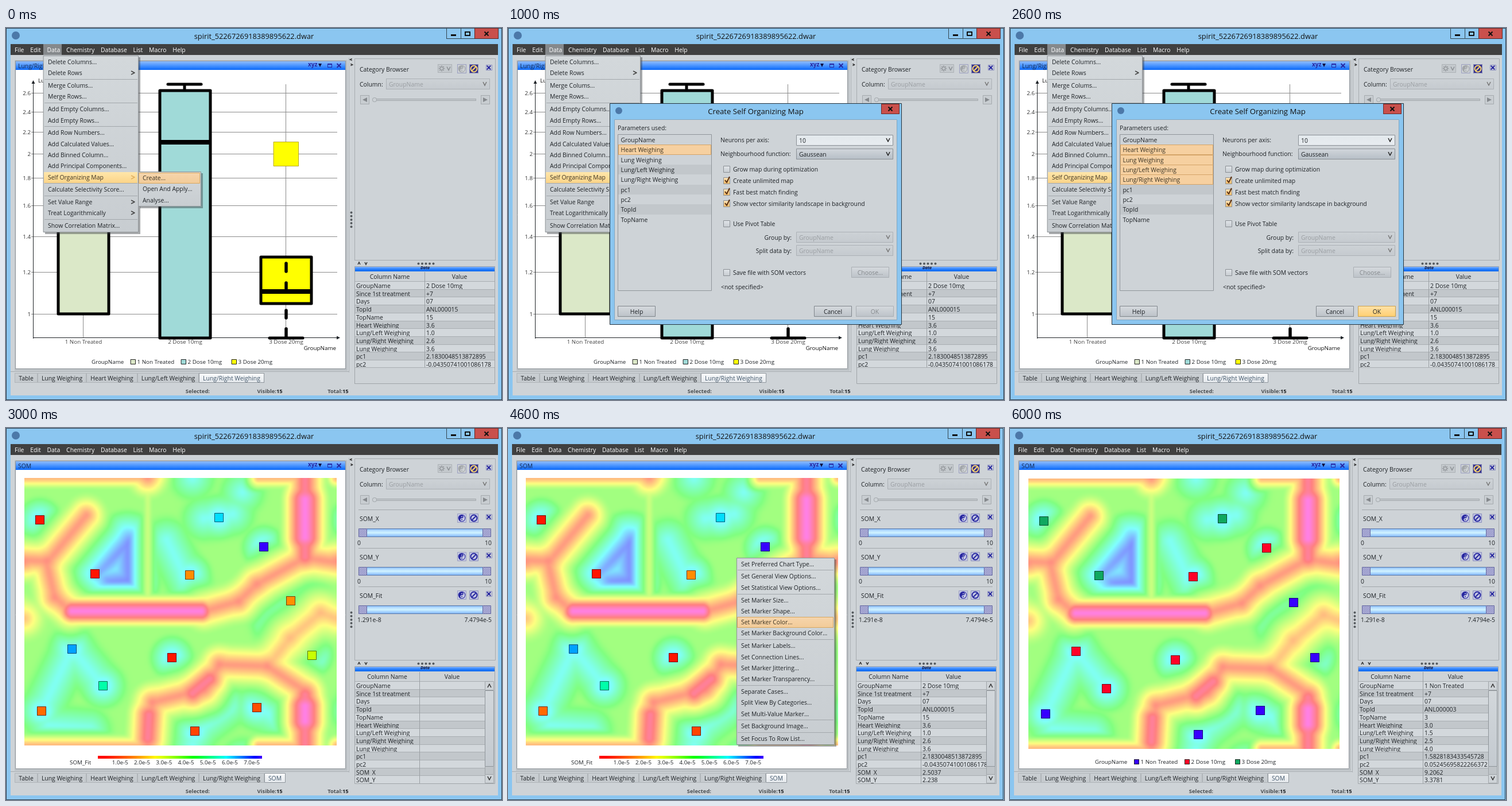
Animation of 864 by 648 pixels, one loop 7 s. Source, as an HTML page with a canvas:

```html
<!DOCTYPE html>
<html lang="en">
<head>
<meta charset="utf-8">
<title>Self organizing map</title>
<style>
html, body { margin: 0; width: 864px; height: 648px; overflow: hidden; }
canvas { display: block; }
</style>
</head>
<body>
<canvas width="864" height="648"></canvas>
<script>
const g = document.querySelector('canvas').getContext('2d');
const BLUE = '#8bc6f0', PANEL = '#ced3d7', DARK = '#c2c7cb', EDGE = '#a5aaae', INK = '#1e2226',
  NAVY = '#2828a0', PALE = '#9a9ea2', PICK = '#f6d0a0', LOGO = '#4c78a8', CLOSE = '#c9504c';

// ---- drawing helpers (text y is the middle of the line) ----
function text(s, x, y, color = INK, align = 'left', size = 10.4, weight = '') {
  g.font = `${weight} ${size}px "Open Sans", sans-serif`;
  g.textAlign = align;
  g.fillStyle = color;
  g.fillText(s, x, y + 4);
  return g.measureText(s).width;
}
function rect(x, y, w, h, fill, stroke) {
  if (fill) { g.fillStyle = fill; g.fillRect(x, y, w, h); }
  if (stroke) { g.strokeStyle = stroke; g.lineWidth = 1; g.strokeRect(x + .5, y + .5, w - 1, h - 1); }
}
function blend(x, y, w, h, colors, stroke, across) {
  const b = across ? g.createLinearGradient(x, 0, x + w, 0) : g.createLinearGradient(0, y, 0, y + h);
  colors.forEach((c, i) => b.addColorStop(i / (colors.length - 1), c));
  rect(x, y, w, h, b, stroke);
}
function line(points, color = INK, width = 1, cap = 'butt') {
  g.strokeStyle = color; g.lineWidth = width; g.lineCap = cap;
  g.beginPath();
  for (let i = 0; i < points.length; i += 2) g.lineTo(points[i], points[i + 1]);
  g.stroke();
}
function disc(x, y, r, color) {
  g.fillStyle = color; g.beginPath(); g.arc(x, y, r, 0, 7); g.fill();
}
function cross(x, y, r, color, width = 2) {
  line([x - r, y - r, x + r, y + r], color, width);
  line([x - r, y + r, x + r, y - r], color, width);
}
// dx, dy give the pointing direction
function chevron(x, y, dx, dy, color = '#333', r = 3, width = 1.5) {
  line([x - r * (dx || 1), y - r * (dy || 1), x + r * dx, y + r * dy,
    x + (dx ? -r * dx : r), y + (dy ? -r * dy : r)], color, width);
}
function triangle(x, y, dx, dy, color, r) {
  g.fillStyle = color; g.beginPath();
  g.moveTo(x + dx * r, y + dy * r);
  g.lineTo(x - dx * r - dy * r, y - dy * r - dx * r);
  g.lineTo(x - dx * r + dy * r, y - dy * r + dx * r);
  g.fill();
}
function button(label, x, y, state) {
  blend(x, y, 66, 19, state === 'hot' ? ['#ffe2a8', '#ffcf70'] : ['#d6dade', '#bcc2c8'],
    state === 'hot' ? '#c9a050' : state === 'off' ? '#a9aeb3' : '#80868c');
  text(label, x + 33, y + 9.5, state === 'off' ? '#85898d' : INK, 'center');
}
function combo(label, x, y, w, style = ['#d2d7dc', '#b6bec6'], off) {
  blend(x, y, w, 19, off ? ['#cdd2d6', '#c5cacf'] : style, off ? '#acb1b6' : '#8a9096');
  text(label, x + 5, y + 9.5, off ? PALE : INK);
  chevron(x + w - 9, y + 9, 0, 1, off ? '#777' : '#222');
}
function checkbox(label, y, on, x = 375) {
  blend(x, y - 6, 12, 12, on ? ['#ffe8c0', '#f4b860'] : ['#e2e6ea', '#c6cbd0'], '#8a8f94');
  if (on) line([x + 3, y - 1, x + 6, y + 3, x + 11, y - 7], '#5a3010', 2);
  text(label, x + 17, y);
}
function list(items, x, y, w, isOn, onColor, onEdge) {
  items.forEach((s, i) => {
    const top = Math.round(y + 17.35 * i);
    rect(x, top, w, 18, isOn(i) ? onColor : i % 2 ? DARK : PANEL, isOn(i) ? onEdge : null);
    text(s, x + 4.5, top + 8.8, isOn(i) ? '#3c3424' : INK);
  });
}
// a leading "-" puts a separator above the item, a trailing ">" marks a submenu
function menu(x, y, w, h, first, items, hot) {
  rect(x + 3, y + 3, w, h, 'rgba(60,65,70,.45)');
  blend(x, y, w, h, ['#d3d8db', '#c8cdd1'], '#8d9296');
  let mid = first;
  items.forEach((item, i) => {
    const [, bar, label, sub] = item.match(/^(-?)(.*?)(>?)$/);
    if (i) mid += bar ? 21.8 : 19.3;
    const row = Math.round(mid), on = label.startsWith(hot);
    if (bar) line([x + 2, row - 10.5, x + w - 2, row - 10.5], '#a3a8ac');
    if (on) blend(x + 1, row - 9, w - 3, 19, sub ? ['#ffe6aa', '#fbd488'] : ['#f6d5ac', '#f2cb98'], sub ? null : '#d8a860');
    text(label, x + 8, row, on ? '#3c3424' : INK);
    if (sub) chevron(x + 156, row, 1, 0, on ? '#e0b060' : '#444');
  });
}
function dialog(title, x, y, w, h, margin, clientH) {
  rect(x, y, w, h, BLUE, '#26343e');
  rect(x + margin, y + 28, w - 2 * margin, clientH, PANEL, '#7fa6c2');
  disc(x + 16, y + 13, 6, LOGO);
  text(title, x + w / 2, y + 14.5, '#111', 'center', 13.2);
  rect(x + w - 36, y + 1, 32, 18, CLOSE, '#6f2a28');
  cross(x + w - 20, y + 10, 3.5, '#111');
}

// ---- data points per group: x, y, hue ----
const groups = ['1 Non Treated', '2 Dose 10mg', '3 Dose 20mg'];
const groupColors = ['#3700ff', '#ff0028', '#10a860'];
const markers = [
  [[496, 301, 34], [533, 396, 73], [62, 493, 25], [329, 528, 16], [437, 487, 18]],
  [[449, 207, 253], [320, 256, 33], [115, 385, 202], [289, 400, 5], [169, 449, 160]],
  [[59, 160, 5], [155, 254, 5], [371, 156, 188]]];

// ---- landscape on a torus: each valley or ridge line is a slope away from its level (a hue) ----
const MAP = { x: 32, y: 87, w: 544, h: 466 };
const valleys = [
  { level: 200, slope: -2.5, paths: markers.flat().map(([x, y]) => [x, y]) },
  { level: 230, slope: -2.3, paths: [[147, 255, 212, 200, 214, 265, 178, 270]] },
  { level: 174, slope: -1.7, paths: [[62, 493, 115, 385, 169, 449], [75, 520, 145, 526], [280, 195, 320, 275],
    [345, 158, 395, 150], [412, 112], [325, 553], [465, 340, 525, 294], [437, 487, 475, 505], [329, 528, 385, 485]] }];
const ridges = [
  { level: 14, slope: 2.7, paths: [[32, 230, 70, 232, 85, 295, 112, 318], [345, 319, 405, 302, 437, 272, 521, 226, 576, 234],
    [75, 230, 140, 152], [521, 458, 455, 415, 372, 412, 345, 455, 255, 478, 247, 553]] },
  { level: 34, slope: 2, paths: [[460, 410, 495, 366, 548, 322, 576, 332]] },
  { level: 28, slope: 5, paths: [[32, 553, 247, 553], [440, 553, 521, 553]] },
  { level: -12, slope: 3.3, paths: [[521, 465, 521, 690], [249, 500, 247, 540], [325, 462, 355, 437]] },
  { level: -48, slope: 4, paths: [[521, 125, 521, 190], [521, 485, 521, 510]] },
  { level: -45, slope: 5.8, paths: [[115, 319, 340, 319]] },
  { level: 86, slope: 5, paths: [[247, 115, 247, 290]] }];

const clamp = (v, low, high) => Math.max(low, Math.min(high, v));
const wrap = (d, size) => d - size * Math.round(d / size);
function segments(kinds) {
  return kinds.flatMap(({ level, slope, paths }) => paths.flatMap(p => {
    const out = [];
    for (let i = 0; i < Math.max(2, p.length - 2); i += 2) {
      const [ax, ay, bx = ax, by = ay] = p.slice(i, i + 4);
      const hx = (bx - ax) / 2, hy = (by - ay) / 2;
      out.push({ level, slope, x: ax + hx, y: ay + hy, hx, hy, len: hx * hx + hy * hy || 1 });
    }
    return out;
  }));
}
function height(s, x, y) {
  const dx = wrap(x - s.x, MAP.w), dy = wrap(y - s.y, MAP.h);
  const t = clamp((dx * s.hx + dy * s.hy) / s.len, -1, 1);
  const ex = dx - t * s.hx, ey = dy - t * s.hy;
  return s.level + s.slope * (Math.sqrt(ex * ex + ey * ey + 16) - 4);
}
function softMin(a, b, k) {
  const h = Math.max(k - Math.abs(a - b), 0);
  return Math.min(a, b) - h * h / (4 * k);
}
function makeLandscape() {
  const low = segments(valleys), high = segments(ridges);
  const map = document.createElement('canvas'), w = map.width = MAP.w / 2, h = map.height = MAP.h / 2;
  const c = map.getContext('2d'), img = c.createImageData(w, h);
  for (let i = 0; i < w * h; i++) {
    const x = MAP.x + 1 + 2 * (i % w), y = MAP.y + 1 + 2 * Math.floor(i / w);
    let hue = 104;
    for (const s of low) hue = -softMin(-hue, -height(s, x, y), 14);
    for (const s of high) hue = softMin(hue, height(s, x, y), 20);
    hue = clamp(hue, -60, 236);
    [0, 8, 4].forEach((shift, ch) => {
      const k = (shift + hue / 30 + 12) % 12;
      img.data[4 * i + ch] = 255 * (.75 - .25 * clamp(Math.min(k - 3, 9 - k), -1, 1));
    });
    img.data[4 * i + 3] = 255;
  }
  c.putImageData(img, 0, 0);
  return map;
}
const landscape = makeLandscape();

// ---- labels ----
const charts = ['Lung Weighing', 'Heart Weighing', 'Lung/Left Weighing', 'Lung/Right Weighing'];
const columns = ['GroupName', 'Since 1st treatment', 'Days', 'TopId', 'TopName', 'Heart Weighing', 'Lung/Left Weighing',
  'Lung/Right Weighing', 'Lung Weighing', 'pc1', 'pc2', 'SOM_X', 'SOM_Y'];
const dose = ['2 Dose 10mg', '+7', '07', 'ANL000015', '15', '3.6', '1.0', '2.6', '3.6', '2.1830048513872895',
  '-0.04350741001086178', '2.5037', '2.238'];
const untreated = ['1 Non Treated', '+7', '07', 'ANL000003', '3', '3.0', '1.5', '2.5', '4.0', '1.5828183433545728',
  '0.05245695822266372', '9.2062', '3.3781'];
const dataMenu = ['Delete Columns...', 'Delete Rows>', '-Merge Colums...', 'Merge Rows...', '-Add Empty Columns...',
  'Add Empty Rows...', '-Add Row Numbers...', 'Add Calculated Values...', 'Add Binned Column...',
  'Add Principal Components...', 'Self Organizing Map>', '-Calculate Selectivity Score...', '-Set Value Range>',
  'Treat Logarithmically>', '-Show Correlation Matrix...'];
const chartMenu = ['Set Preferred Chart Type...', '-Set General View Options...', 'Set Statistical View Options...',
  '-Set Marker Size...', 'Set Marker Shape...', 'Set Marker Color...', 'Set Marker Background Color...',
  '-Set Marker Labels...', 'Set Connection Lines...', 'Set Marker Jittering...', 'Set Marker Transparency...',
  '-Separate Cases...', 'Split View By Categories...', 'Set Multi-Value Marker...', '-Set Background Image...',
  '-Set Focus To Row List...'];

function mainWindow(som) {
  rect(0, 0, 864, 648, BLUE, '#2c3c48');
  disc(17, 13, 7, LOGO);
  text('spirit_5226726918389895622.dwar', 432, 14.5, '#111', 'center', 12.8);
  rect(767, 0, 26, 19, BLUE, '#33454f');
  rect(792, 0, 25, 19, BLUE, '#33454f');
  rect(816, 0, 42, 19, CLOSE, '#5c2826');
  rect(775, 11, 9, 3, '#111');
  g.strokeStyle = '#111'; g.lineWidth = 2; g.strokeRect(800, 7, 8, 6);
  cross(837, 10, 3.5, '#111');
  rect(8, 28, 849, 19, '#404040');
  if (!som) rect(65, 28, 32, 19, '#85898c');
  let x = 15;
  for (const s of ['File', 'Edit', 'Data', 'Chemistry', 'Database', 'List', 'Macro', 'Help'])
    x += text(s, x, 38, '#fff') + 10.8;
  rect(8, 47, 849, 593, PANEL);

  // chart frame
  rect(15, 56, 580, 541, '#bcc1c5');
  rect(16, 57, 576, 537, '#fff', '#8f959a');
  blend(17, 58, 574, 15, ['#8fbcff', '#4a94ff', '#0a68f8']);
  text(som ? 'SOM' : charts[3], 21, 65.5, '#14284e');
  text('xyz', 526, 63, NAVY, 'left', 10, 'bold');
  triangle(547, 65, 0, 1, '#101040', 3);
  rect(560, 62, 8, 7, null, NAVY); rect(560, 62, 8, 2, NAVY);
  cross(580, 65.5, 3.5, NAVY);
  line([8, 598.5, 597, 598.5], EDGE);
  line([597.5, 52, 597.5, 600], '#aeb3b7');

  // tabs and status
  x = 15;
  ['Table', ...charts, ...(som ? ['SOM'] : [])].forEach((s, i, all) => {
    const on = i === all.length - 1, w = Math.round(g.measureText(s).width * (g.font = '10.4px "Open Sans", sans-serif', 0) + g.measureText(s).width) + 14;
    blend(x, 601, w, 17, on ? ['#fafbfc', '#e4e8ec'] : ['#c9ced2', '#c4c9cd'], on ? '#8f969c' : '#b0b5b9');
    text(s, x + w / 2, 609.5, on ? '#41566a' : INK, 'center');
    x += w;
  });
  [['Selected:', 355, ''], ['Visible:', 471, '15'], ['Total:', 586, '15']].forEach(([s, right, v]) => {
    text(s, right, 632, '#4a4e52', 'right', 9.4, 'bold');
    text(v, right, 632, INK, 'left', 9.4, 'bold');
  });

  // splitters
  chevron(601, 55, -1, 0, '#333', 1.7);
  chevron(602, 64, 1, 0, '#333', 1.7);
  chevron(615, 410, 0, -1, '#333', 2);
  chevron(627, 410, 0, 1, '#333', 2);
  for (let i = 0; i < 5; i++) {
    disc(601.5, 321.5 + 6.2 * i, 2, '#555a5e');
    disc(718.5 + 6.5 * i, 410.5, 2, '#555a5e');
  }
}

function yinYang(x, y, color, pale) {
  rect(x, y, 16, 16, pale, '#9a9ec0');
  disc(x + 8, y + 8, 6.3, color);
  g.fillStyle = pale;
  g.beginPath();
  g.arc(x + 8, y + 8, 5.3, -Math.PI / 2, Math.PI / 2);
  g.arc(x + 8, y + 10.6, 2.6, Math.PI / 2, -Math.PI / 2);
  g.arc(x + 8, y + 5.4, 2.6, Math.PI / 2, -Math.PI / 2, true);
  g.fill();
  disc(x + 8, y + 5.4, 1, pale);
  disc(x + 8, y + 10.6, 1, color);
}
function filterIcons(y, used) {
  yinYang(786, y, used ? NAVY : '#a2a6aa', used ? '#c6c9e4' : '#cdd1d4');
  const sign = used ? NAVY : '#ffd870';
  rect(807, y, 16, 16, used ? '#c2c6e2' : '#34308c', '#8a8ebc');
  g.strokeStyle = sign; g.lineWidth = 2;
  g.beginPath(); g.arc(815, y + 8, 5.5, 0, 7); g.stroke();
  line([811, y + 12, 819, y + 4], sign, 2);
  cross(841, y + 6, 3.2, NAVY);
  rect(836, y + 1, 11, 10, null, '#8c90c0');
}
function filters(som) {
  rect(607, 53, 246, 352, null, '#a6abaf');
  text('Category Browser', 616, 72);
  rect(752, 63, 25, 15, '#c4c9cd', '#adb2b6');
  for (let a = 0; a < Math.PI; a += Math.PI / 4) {
    const dx = 5 * Math.cos(a), dy = 5 * Math.sin(a);
    line([759 - dx, 70.5 - dy, 759 + dx, 70.5 + dy], '#8d9195', 1.5);
  }
  disc(759, 70.5, 2, '#c4c9cd');
  chevron(771, 70.5, 0, 1, '#8d9195');
  filterIcons(63, false);
  text('Column:', 616, 98);
  combo('GroupName', 662, 88, 181, null, true);
  [[617, -1], [827, 1]].forEach(([x, d]) => {
    rect(x, 117, 16, 16, '#c8cdd1', EDGE);
    triangle(x + 8, 125, d, 0, '#85898d', 4);
  });
  rect(641, 123, 178, 4, '#c0c5c9', EDGE);
  disc(642, 125, 4, EDGE); disc(642, 125, 3, '#cdd2d6');
  if (!som) return;
  [['SOM_X', '0', '10'], ['SOM_Y', '0', '10'], ['SOM_Fit', '1.291e-8', '7.4794e-5']].forEach(([s, low, high], i) => {
    const y = 142 + 67 * i;
    line([614, y + .5, 845, y + .5], '#a2a7ab');
    text(s, 616, y + 15.5);
    filterIcons(y + 7, true);
    blend(614, y + 33, 231, 15, ['#7aaef0', '#b4dcff', '#d0f2ff', '#a4d2ff', '#78acf0'], '#5878a8');
    [614, 830].forEach(x => {
      rect(x, y + 33, 15, 15, '#b4b4dc', '#6468a0');
      for (let k = 3; k < 13; k += 3) {
        line([x + 1, y + 34 + k, x + 1 + k, y + 34], '#8084b8');
        line([x + k, y + 47, x + 14, y + 33 + k], '#8084b8');
      }
    });
    text(low, 612, y + 58);
    text(high, 846, y + 58, INK, 'right');
  });
}

function scrollbar(x, y, h, thumb, thumbH) {
  rect(x, y, 16, h, '#bfc4c8', '#a0a5a9');
  rect(x, y, 16, 16, PANEL, '#a0a5a9');
  rect(x, y + h - 16, 16, 16, PANEL, '#a0a5a9');
  chevron(x + 8, y + 8, 0, -1);
  chevron(x + 8, y + h - 9, 0, 1);
  blend(x, thumb, 16, thumbH, ['#d2d7db', '#c4cad0'], '#8f959a');
}

function dataTable(som, values) {
  const split = som ? 720 : 729, right = som ? 834 : 851, rows = som ? 13 : 11;
  rect(607, 415, 245, 205, null, '#a0a5a9');
  blend(608, 416, 243, 8, ['#80b4ff', '#2a80fc', '#0a68f0']);
  text('Data', 730, 415.8, '#101030', 'center', 7, 'italic bold');
  text('Column Name', (608 + split) / 2, 433, INK, 'center');
  text('Value', (split + right) / 2, 433, INK, 'center');
  for (let i = 0; i < rows; i++) {
    const y = Math.round(441 + 13.7 * i);
    g.save();
    g.beginPath(); g.rect(608, y, right - 608, Math.min(14, 619 - y)); g.clip();
    rect(608, y, right - 608, 14, i % 2 ? DARK : '#d3d8dc');
    text(columns[i], 610, y + 8);
    text(values[i] || '', split + 3, y + 8);
    line([608, y + .5, right, y + .5], '#a9aeb2');
    g.restore();
  }
  line([split + .5, 425, split + .5, Math.min(619, 441 + 13.7 * rows)], '#9a9fa3');
  if (som) scrollbar(834, 441, 178, 457, 133);
  else line([608, 591.5, right, 591.5], '#a9aeb2');
}

function legend(colors) {
  text('GroupName', 149, 581, INK, 'left', 9.8);
  groups.forEach((s, i) => {
    rect(217 + 88 * i, 577, 9, 9, colors[i], '#222');
    text(s, 228.5 + 88 * i, 581, INK, 'left', 9.8);
  });
}

function boxPlot() {
  const colors = ['#dbe8c8', '#a0dad8', '#ffff00'], center = i => 135 + Math.round(176.5 * i);
  for (let v = 1; v < 2.7; v += .2) {
    const y = Math.round(498 - 402.5 * Math.log(v));
    line([44, y + .5, 577, y + .5], '#8c8c8c');
    text(String(+v.toFixed(1)), 43, y, '#333', 'right', 9.8);
  }
  groups.forEach((s, i) => {
    line([center(i) - .5, 98, center(i) - .5, 540], '#8c8c8c');
    text(s, center(i), 545.5, '#444', 'center', 9.8);
  });
  line([47.5, 541, 47.5, 95]); triangle(47.5, 94, 0, -1, INK, 3);
  line([47, 539.5, 578, 539.5]); triangle(579, 539.5, 1, 0, INK, 3);
  text(charts[3], 56, 91, '#111', 'left', 9.8);
  text('GroupName', 575, 556.5, '#111', 'right', 9.8);

  const box = (i, top, bottom, median) => {
    const x = center(i);
    g.fillStyle = colors[i]; g.strokeStyle = '#000'; g.lineWidth = 5; g.lineJoin = 'round';
    g.beginPath(); g.rect(x - 44, top, 88, bottom - top); g.fill(); g.stroke();
    if (median) line([x - 44, median, x + 44, median], '#000', 8);
  };
  box(0, 320, 498);
  line([311, 98, 311, 109], '#000', 5);
  line([282, 98, 340, 98], '#000', 5, 'round');
  box(1, 109, 540, 199);
  box(2, 399, 480, 459);
  [[410, 424], [444, 456], [492, 505], [524, 539]].forEach(([a, b]) => line([488, a, 488, b], '#000', 5.5, 'round'));
  line([459, 540, 517, 540], '#000', 5, 'round');
  rect(466, 198, 44, 43, '#ffff00', '#b8a820');
  legend(colors);
}

function mapChart(byGroup) {
  const [x0, y0, w, h] = byGroup ? [33, 88, 542, 471] : [MAP.x, MAP.y, MAP.w, MAP.h];
  g.drawImage(landscape, x0, y0, w, h);
  markers.forEach((points, group) => points.forEach(([x, y, hue]) => {
    const mx = Math.round(x0 + (x - MAP.x) * w / MAP.w), my = Math.round(y0 + (y - MAP.y) * h / MAP.h);
    rect(mx - 8, my - 8, 16, 16, byGroup ? groupColors[group] : `hsl(${hue} 100% 50%)`, 'rgba(0,0,0,.55)');
  }));
  if (byGroup) return legend(groupColors);
  text('SOM_Fit', 111, 581.5, INK, 'left', 9.8);
  const hues = Array.from({ length: 24 }, (_, i) => 255 * (i / 23) ** 1.4);
  blend(160, 571, 286, 5, hues.map(d => `hsl(${d} 100% 50%)`), null, true);
  for (let i = 1; i < 8; i++) text(i + '.0e-5', 160.5 + 38.24 * i, 581.5, INK, 'center', 9.8);
}

function parameterDialog(last) {
  dialog('Create Self Organizing Map', 177, 131, 509, 386, 8, 350);
  text('Parameters used:', 191, 174);
  rect(191, 185, 164, 273, PANEL, '#8f959a');
  list(['GroupName', 'Heart Weighing', 'Lung Weighing', 'Lung/Left Weighing', 'Lung/Right Weighing', 'pc1', 'pc2', 'TopId', 'TopName'],
    192, 186, 162, i => i > 0 && i <= last, PICK, '#d4a468');
  text('Neurons per axis:', 370, 195);
  combo('10', 502, 186, 169, ['#e2e8ec', '#e8ecf0']);
  text('Neighbourhood function:', 370, 219);
  combo('Gaussean', 502, 210, 169);
  ['Grow map during optimization', 'Create unlimited map', 'Fast best match finding', 'Show vector similarity landscape in background']
    .forEach((s, i) => checkbox(s, 246 + 20 * i, i > 0));
  checkbox('Use Pivot Table', 341);
  ['Group by:', 'Split data by:'].forEach((s, i) => {
    text(s, 494, 364.5 + 23 * i, INK, 'right');
    combo('GroupName', 502, 355 + 23 * i, 169, null, true);
  });
  checkbox('Save file with SOM vectors', 426);
  button('Choose...', 598, 416, 'off');
  text('<not specified>', 371, 451);
  button('Help', 191, 484);
  button('Cancel', 533, 484);
  button('OK', 606, 484, last === 1 ? 'off' : 'hot');
}

function colorDialog() {
  dialog('Set Marker Color', 290, 212, 282, 223, 7, 188);
  text('Color by:', 305, 258);
  combo('SOM_Fit', 421, 248, 136, ['#ffdca0', '#f8c478']);
  rect(312, 285, 18, 18, '#fff', '#888');
  rect(314, 287, 14, 14, '#ff1400');
  rect(337, 286, 100, 17, '#fff', '#888');
  for (let i = 0; i < 11; i++) rect(339 + 8 * i, 288, 8, 13, `hsl(${8 * i + .35 * i * i} 100% 50%)`);
  checkbox('Color', 328, false, 376);
  text('Set color range from', 319, 361);
  button('Cancel', 419, 402);
  button('OK', 492, 402);
  rect(421, 267, 135, 142, PANEL, '#858b90');
  list(['<Unassigned>', ...columns.slice(0, 7)], 422, 269, 117, i => i === 1, '#ffca78');
  scrollbar(539, 268, 140, 286, 55);
}

function draw(step) {
  const som = step > 2;
  g.setTransform(1, 0, 0, 1, 0, 0);
  rect(0, 0, 864, 648, BLUE);
  if (step > 3) g.translate(-1, 0);
  mainWindow(som);
  filters(som);
  dataTable(som, step === 3 ? [] : step === 6 ? untreated : dose);
  if (som) mapChart(step === 6); else boxPlot();
  g.setTransform(1, 0, 0, 1, 0, 0);
  if (!som) menu(65, 48, 166, 308, 59, dataMenu, 'Self');
  if (step === 0) menu(230, 250, 110, 61, 261, ['Create...', 'Open And Apply...', 'Analyse...'], 'Create');
  if (step === 1 || step === 2) parameterDialog(step === 1 ? 1 : 4);
  if (step === 4 || step === 5) menu(398, 226, 171, 326, 236.6, chartMenu, 'Set Marker Color');
  if (step === 5) colorDialog();
}

let shown = -1;
function tick(now) {
  const step = Math.floor(now / 1000) % 7;
  if (step !== shown) draw(shown = step);
  requestAnimationFrame(tick);
}
tick(0);
</script>
</body>
</html>
```
